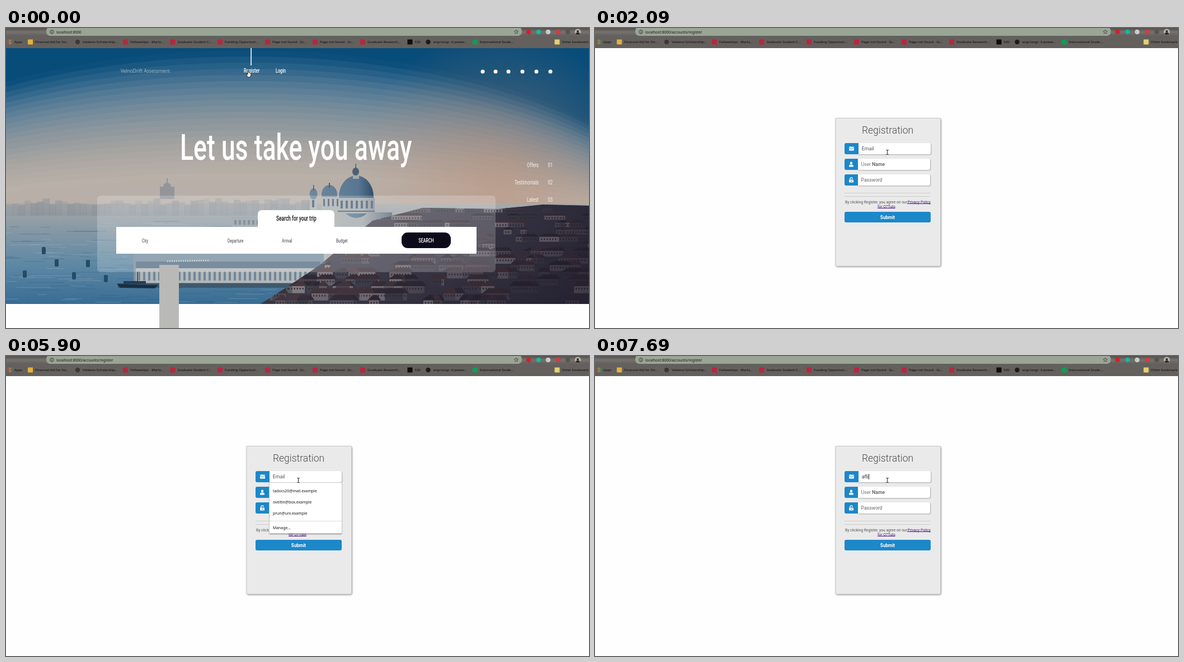
Write an HTML page with a canvas that moves like this. It is 1042 px wide and 537 px high and loops after 8000 ms.

```html
<!DOCTYPE html>
<html lang="en">
<head>
<meta charset="utf-8">
<title>Registration walkthrough</title>
<style>
html, body { margin: 0; width: 100%; height: 100%; overflow: hidden; background: #fefefe; }
canvas { display: block; }
</style>
</head>
<body>
<canvas id="stage" width="1042" height="537"></canvas>
<script>
const W = 1042, H = 537, LOOP = 8000;
const stage = document.getElementById('stage').getContext('2d');
let g = stage;

const UI = '"Noto Sans", sans-serif', FORM = 'Roboto, sans-serif';
const NARROW = 0.69; // condensed look of the travel page face
const BLUE = '#1c87c9', PAGE = '#fefefe';

function rect(x, y, w, h, color) {
  g.fillStyle = color;
  g.fillRect(x, y, w, h);
}
function round(x, y, w, h, r, color) {
  g.fillStyle = color;
  g.beginPath();
  g.roundRect(x, y, w, h, r);
  g.fill();
}
function disc(x, y, rx, color, ry = rx) {
  g.fillStyle = color;
  g.beginPath();
  g.ellipse(x, y, rx, ry, 0, 0, Math.PI * 2);
  g.fill();
}
function poly(points, color, outline) {
  g.beginPath();
  points.forEach(([x, y]) => g.lineTo(x, y));
  g.closePath();
  g.fillStyle = color;
  g.fill();
  if (outline) {
    g.strokeStyle = outline;
    g.lineWidth = 1;
    g.stroke();
  }
}
function text(str, x, y, font, color, align = 'left') {
  g.font = font;
  g.fillStyle = color;
  g.textAlign = align;
  g.fillText(str, x, y);
}
function narrow(str, x, y, size, color, weight = 400, align) {
  g.save();
  g.translate(x, y);
  g.scale(NARROW, 1);
  text(str, 0, 0, `${weight} ${size}px ${FORM}`, color, align);
  g.restore();
}
function shadowed(blur, dx, dy, color, draw) {
  g.save();
  g.shadowBlur = blur;
  g.shadowOffsetX = dx;
  g.shadowOffsetY = dy;
  g.shadowColor = color;
  draw();
  g.restore();
}
function withStops(grad, stops) {
  stops.forEach(([at, color]) => grad.addColorStop(at, color));
  return grad;
}
const vertical = (y0, y1, stops) => withStops(g.createLinearGradient(0, y0, 0, y1), stops);
const horizontal = (x0, x1, stops) => withStops(g.createLinearGradient(x0, 0, x1, 0), stops);

function seeded(seed) {
  return () => (seed = (seed * 16807) % 2147483647) / 2147483647;
}
function layer(paint) {
  const canvas = document.createElement('canvas');
  canvas.width = W;
  canvas.height = H;
  g = canvas.getContext('2d');
  paint();
  g = stage;
  return canvas;
}

// Browser bar

function paintBrowser() {
  rect(0, 0, W, 36, '#63605d');
  rect(0, 0, W, 14, vertical(0, 14, [[0, '#524f4c'], [0.5, '#75726f'], [1, '#63605d']]));
  round(72, -2, 850, 16, 7, '#9aa595');
  g.strokeStyle = '#222';
  g.lineWidth = 0.8;
  g.beginPath();
  g.arc(82, 7, 3.3, 0, 7);
  g.stroke();
  rect(81.6, 6.4, 0.9, 2.6, '#222');
  rect(81.6, 4.8, 0.9, 0.9, '#222');

  g.beginPath();
  for (let i = 0; i < 10; i++) {
    const r = i % 2 ? 1.7 : 4, a = i * Math.PI / 5 - Math.PI / 2;
    g.lineTo(912 + r * Math.cos(a), 7 + r * Math.sin(a));
  }
  g.closePath();
  g.strokeStyle = '#444';
  g.stroke();

  [[934, '#d3202c'], [952, '#17b897'], [969, '#c9cccd'], [987, '#d63a40'], [1004, '#575451']]
    .forEach(([x, color]) => disc(x, 7, 4.3, color));
  disc(1022, 7, 5.5, '#b9b5ae');
  disc(1022, 6, 2, '#2b2826');
  disc(1022, 10, 3.8, '#2b2826', 2);

  for (let i = 0; i < 9; i++)
    rect(3 + (i % 3) * 3, 21 + Math.floor(i / 3) * 3, 2, 2, ['#c65346', '#c9a23b', '#4d9a5c'][i % 3]);

  const maroon = '#b7273f';
  [
    [15, 'Apps'],
    [52, 'Financial Aid for Int...', '#e3b23c'],
    [137, 'Valdena Scholarship...', '#3b3937', true],
    [222, 'Fellowships - Marlo...', maroon],
    [306.5, 'Graduate Student C...', maroon],
    [391, 'Funding Opportuni...', maroon],
    [476, 'Page not found - Gr...', maroon],
    [561, 'Page not found - Gr...', maroon],
    [646, 'Graduate Research...', maroon],
    [730.5, 'S30', '#0d0d0d'],
    [763.5, 'angr/angr: A power...', '#1d1b1a', true],
    [847, 'International Stude...', '#0f9d58'],
    [993.5, 'Other bookmark', '#e5cf72']
  ].forEach(([x, label, color, circle]) => {
    if (circle) disc(x - 9, 25, 4.2, color);
    else if (color) rect(x - 13, 20.5, 9, 9, color);
    text(label, x, 27.2, `6.1px ${UI}`, '#0c0c0c');
  });
}

// Travel page

const SKY = [
  [36, 8, 76, 122], [60, 36, 95, 135], [90, 78, 119, 148], [125, 112, 137, 154],
  [165, 142, 151, 157], [210, 168, 166, 162], [260, 185, 176, 168], [330, 180, 174, 168]
];
function skyColor(y) {
  let i = 0;
  while (i < SKY.length - 2 && y > SKY[i + 1][0]) i++;
  const a = SKY[i], b = SKY[i + 1], k = (y - a[0]) / (b[0] - a[0]);
  return `rgb(${[1, 2, 3].map(n => Math.round(a[n] + (b[n] - a[n]) * k))})`;
}

function paintSky() {
  rect(0, 36, W, 300, skyColor(36));
  for (let y = 40; y < 325; y += 11) disc(430, 420, 820, skyColor(y), 420 - y);
  const glow = withStops(g.createRadialGradient(880, 265, 20, 880, 265, 260),
    [[0, 'rgba(190,140,115,.45)'], [1, 'rgba(190,140,115,0)']]);
  rect(600, 36, 442, 300, glow);
}

function paintWater(rnd) {
  rect(0, 314, W, 180, vertical(314, 494, [
    [0, '#a9a9a8'], [0.25, '#8799a5'], [0.6, '#5f88a4'], [1, '#386c94']]));
  for (let i = 0; i < 50; i++) {
    const h = 3 + rnd() * 12;
    rect(i * 11, 320 - h, 12, h + 16, `rgba(125,135,145,${0.2 + rnd() * 0.25})`);
  }
  for (let i = 0; i < 160; i++)
    rect(rnd() * 520 - 20, 345 + rnd() * 148, 15 + rnd() * 50, 1,
      rnd() < 0.5 ? 'rgba(35,85,120,.3)' : 'rgba(180,195,202,.3)');

  const haze = '#939599';
  rect(275, 284, 26, 22, haze);
  disc(288, 284, 7, haze);
  rect(287, 269, 2, 10, haze);
}

function paintBasilica() {
  const dome = horizontal(540, 660, [[0, '#71889b'], [0.5, '#607d95'], [0.75, '#587691'], [1, '#2d4a66']]);
  const stone = horizontal(540, 690, [[0, '#aeb2b3'], [0.65, '#a3a8ab'], [1, '#5c6b79']]);
  const shade = '#4b6074';

  rect(404, 338, 150, 66, '#929ca3');
  for (let x = 408; x < 545; x += 8) rect(x, 344, 4, 8, '#657887');
  rect(505, 330, 185, 90, stone);
  rect(595, 300, 62, 40, stone);
  disc(626, 302, 31, dome, 38);
  rect(593, 304, 66, 28, stone);
  for (let x = 598; x < 656; x += 9) rect(x, 309, 4, 14, shade);
  rect(593, 327, 66, 2, shade);
  rect(620, 257, 11, 13, stone);
  disc(625, 257, 6, shade, 7);
  rect(624.5, 243, 1.5, 10, shade);
  disc(578, 298, 14, dome, 17);
  rect(564, 302, 29, 33, stone);
  for (let x = 567; x < 592; x += 8) rect(x, 306, 3, 13, shade);
  rect(577, 277, 2, 9, shade);
  rect(543, 298, 13, 50, stone);
  rect(547, 308, 4, 13, shade);
  disc(549.5, 297, 7, dome, 10);
  rect(549, 281, 1.5, 10, shade);
}

function paintWaterfront() {
  rect(228, 404, 340, 56, '#7990a0');
  rect(232, 418, 330, 12, '#587187');
  rect(232, 430, 330, 26, '#b3b8b9');
  for (let x = 236; x < 560; x += 9) rect(x, 436, 4, 16, '#718899');
  rect(200, 457, 330, 8, '#3f596c');
}

function paintCity(rnd) {
  g.save();
  poly([[455, 494], [505, 462], [560, 425], [655, 345], [745, 322], [880, 324],
    [960, 316], [W, 318], [W, 494]], '#4b4a57');
  g.clip();
  for (let i = 0; i < 280; i++) {
    const depth = Math.floor(i / 20) / 14, y = 320 + depth * 170;
    const x = 440 + rnd() * 610, w = 10 + rnd() * 34, h = 3 + depth * 7, lean = 3 + rnd() * 12;
    const light = rnd() ** 2, warm = rnd();
    rect(x, y + h, w, h + 4, `rgb(${78 + light * 105},${78 + light * 95},${88 + light * 85})`);
    poly([[x + lean, y], [x + w - 3, y], [x + w + 4, y + h], [x - 3, y + h]],
      `rgb(${52 + warm * 46},${48 + warm * 22},${58 + warm * 14})`);
    for (let k = 3; k < w - 2; k += 5) rect(x + k, y + h + 3, 2, 3, '#353846');
  }
  rect(440, 310, 602, 184, horizontal(560, W, [[0, 'rgba(24,22,40,0)'], [1, 'rgba(24,20,36,.62)']]));
  rect(440, 310, 602, 184, vertical(330, 494, [[0, 'rgba(24,20,36,0)'], [1, 'rgba(24,20,36,.35)']]));
  g.restore();
}

function paintLagoon() {
  const rnd = seeded(77);
  paintSky();
  paintWater(rnd);
  paintBasilica();
  paintWaterfront();
  paintCity(rnd);

  // boat and mooring posts
  poly([[198, 458], [272, 460], [266, 466], [204, 465]], '#182f43');
  rect(210, 453, 40, 5, '#243d51');
  rect(234, 436, 1.5, 20, '#263c4d');
  [[33, 440], [90, 420], [121, 443], [146, 421], [178, 448], [67, 398]]
    .forEach(([x, y]) => round(x - 3, y - 6, 7, 13, 2, '#264b66'));
}

function paintTravel() {
  rect(0, 0, W, H, PAGE);
  g.save();
  g.beginPath();
  g.rect(0, 36, W, 458);
  g.clip();
  paintLagoon();
  g.restore();

  rect(437.3, 36, 1.6, 31, '#fff');
  text('VelnoDrift Assessment', 205, 79.5, '8.4px "Open Sans", sans-serif', '#b4bfc6');
  narrow('Register', 425, 80, 11, '#fff', 500);
  narrow('Login', 482, 80, 10.5, '#fff', 500);
  [852, 875, 898, 923, 948, 973].forEach(x => disc(x, 78, 3.5, '#fff'));
  narrow('Let us take you away', 311, 236, 64.5, '#fff', 500);
  [['Offers', '01'], ['Testimonials', '02'], ['Latest', '03']].forEach(([label, no], i) => {
    const y = 249 + i * 31;
    narrow(label, 952, y, 11, '#f4f4f4', 400, 'right');
    narrow(no, 977, y, 11, '#f4f4f4', 400, 'right');
  });

  round(163, 300, 712, 137, 6, 'rgba(255,255,255,.2)');
  round(450, 326, 137, 32, [7, 7, 0, 0], '#fff');
  rect(197, 356, 644, 48, '#fff');
  narrow('Search for your trip', 483, 345, 12.1, '#111', 500);
  [['City', 243], ['Departure', 396], ['Arrival', 493], ['Budget', 590]]
    .forEach(([label, x]) => narrow(label, x, 384, 9.4, '#3c3c48'));
  round(707, 366, 88, 28, 11, '#0d0a1a');
  narrow('SEARCH', 751, 384, 10.4, '#fff', 500, 'center');
  for (let x = 288; x < 362; x += 4) rect(x, 416 - (x - 288) / 50, 2, 3, 'rgba(235,238,240,.6)');
  rect(274, 424, 35, 113, '#b9b9b7');
}

// Registration page

function envelope(x, y) {
  round(x - 4.5, y - 3.5, 9, 7, 1, '#fff');
  g.strokeStyle = BLUE;
  g.lineWidth = 0.9;
  g.beginPath();
  g.moveTo(x - 4.5, y - 1.8);
  g.lineTo(x, y + 1.2);
  g.lineTo(x + 4.5, y - 1.8);
  g.stroke();
}
function person(x, y) {
  disc(x, y - 2.2, 2.3, '#fff');
  round(x - 4, y + 0.6, 8, 4, [3, 3, 1, 1], '#fff');
}
function padlock(x, y) {
  round(x - 4, y - 0.5, 8, 5, 1, '#fff');
  g.strokeStyle = '#fff';
  g.lineWidth = 1.3;
  g.beginPath();
  g.moveTo(x - 2.2, y);
  g.lineTo(x - 2.2, y - 2);
  g.arc(x, y - 2, 2.2, Math.PI, 0);
  g.stroke();
  disc(x, y + 2, 0.9, BLUE);
}
function field(y, split, icon) {
  shadowed(2, 1, 1, 'rgba(0,0,0,.28)', () => round(split, y, 129, 20, [0, 3, 3, 0], '#fff'));
  round(446, y, split - 446, 20, [3, 0, 0, 3], BLUE);
  icon((446 + split) / 2, y + 10);
}

function paintForm() {
  rect(0, 0, W, H, PAGE);
  shadowed(3, 1, 1, 'rgba(0,0,0,.5)', () => round(429.5, 161.5, 188, 265, 3, '#eaeaea'));
  g.strokeStyle = '#c9c9c9';
  g.lineWidth = 1;
  g.strokeRect(430, 161.5, 187.5, 264.5);
  text('Registration', 523, 188.5, `300 17.5px ${FORM}`, '#4c4c4c', 'center');

  field(206, 471, envelope);
  field(234, 470, person);
  field(262, 470, padlock);
  text('User', 475.5, 247, `8.6px ${FORM}`, '#757575');
  text('Name', 495, 247, `500 8.6px ${FORM}`, '#555');
  text('Password', 475.5, 275, `8.6px ${FORM}`, '#666');
  rect(446, 295, 154, 1, '#cecece');
  rect(446, 301, 154, 1, '#cecece');

  const font = `6.75px ${FORM}`, link = '#551a8b';
  text('By clicking Register, you agree on our', 447, 313.5, font, '#555');
  text('Privacy Policy', 600, 313.5, font, link, 'right');
  text('for Q7Tulo', 505, 321.5, font, link);
  const tail = 505 + g.measureText('for Q7Tulo').width;
  text('.', tail, 321.5, font, '#555');
  rect(558, 314, 42, 1, link);
  rect(505, 322, tail - 505, 1, link);
  round(446, 329, 154, 19, 3, BLUE);
  text('Submit', 523, 341.5, `700 8.2px ${FORM}`, '#fff', 'center');
}

function dropdown(items, bottom, manage) {
  shadowed(2, 0, 1, 'rgba(0,0,0,.4)', () => rect(471, 227, 129, bottom - 227, '#fff'));
  g.strokeStyle = '#c8c8c8';
  g.lineWidth = 1;
  g.strokeRect(470.5, 226.5, 130, bottom - 227);
  const font = `6.9px ${UI}`;
  items.forEach((item, i) => text(item, 477, 244.3 + i * 19.8, font, '#161616'));
  if (manage) {
    rect(471, 295, 129, 1, '#dcdcdc');
    text('Manage...', 477, 309.8, font, '#161616');
  }
}

// Pointers

function hand(x, y) {
  poly([[x - 2, y - 6], [x - 0.5, y - 6], [x, y - 2], [x + 3.5, y - 1], [x + 4, y + 1.5],
    [x + 2.5, y + 6], [x - 2, y + 6], [x - 4.5, y + 1], [x - 4, y], [x - 2, y + 1.5]], '#fff', '#222');
}
function arrow(x, y) {
  poly([[x + 0.5, y + 0.5], [x + 0.5, y + 9], [x + 2.5, y + 7.2], [x + 4, y + 10.5],
    [x + 5, y + 10], [x + 3.8, y + 6.8], [x + 6.5, y + 6.6]], '#fff', '#222');
}
function beam(x, y) {
  rect(x, y - 4, 1, 9, '#222');
  rect(x - 2, y - 4, 5, 1, '#444');
  rect(x - 2, y + 4, 5, 1, '#444');
}

// Timeline

const POINTER = [
  [0, hand, 434, 82], [1430, arrow, 465, 120], [1580, arrow, 489, 163], [1700, arrow, 512, 203],
  [1820, beam, 523, 224], [1960, beam, 523, 223], [2090, beam, 522, 222]
];
const TYPED = [[0, ''], [6180, 'a'], [6330, 'af'], [6480, 'afl'], [6760, 'afli']];
const BLINKS = [2240, 2670, 3230, 3790, 4220, 4750, 5310, 5900, 6180, 7280, 7690];
const SAVED = ['tadocs20@mail.example', 'oveltin@box.example', 'prun@uni.example'];
const MATCHES = ['a@x.example', 'ab@x.example', 'asfdasf', 'a', 'abc', 'afel@me.example'];
const SUGGESTIONS = [
  [0], [2240, SAVED, 318, true], [6180, MATCHES, 355], [6330, MATCHES.slice(-1), 256], [6480]
];

const latest = (steps, t) => steps.filter(step => step[0] <= t).pop();

const browser = layer(paintBrowser);
const travel = layer(paintTravel);
const form = layer(paintForm);

function drawEmail(t) {
  const [, items, bottom, manage] = latest(SUGGESTIONS, t);
  if (items) dropdown(items, bottom, manage);

  const typed = latest(TYPED, t)[1];
  text(typed || 'Email', 476.7, 219, `8.8px ${FORM}`, typed ? '#333' : '#555');
  const caretOn = BLINKS.filter(at => at <= t).length % 2;
  if (caretOn) rect(Math.round(477 + (typed ? g.measureText(typed).width : 0)), 211, 1, 10, '#222');
}

function draw(t) {
  const onForm = t >= 1150;
  g.drawImage(onForm ? form : travel, 0, 0);
  if (onForm) drawEmail(t);
  g.drawImage(browser, 0, 0);
  text('localhost:8000' + (t >= 870 ? '/accounts/register' : ''), 90, 9.5, `6.6px ${UI}`, '#161816');
  if (t >= 590 && !onForm) rect(40, 4, 4, 1, '#5a5754');
  const [, pointer, x, y] = latest(POINTER, t);
  pointer(x, y);
}

function tick() {
  draw(performance.now() % LOOP);
  requestAnimationFrame(tick);
}
tick();
</script>
</body>
</html>
```
